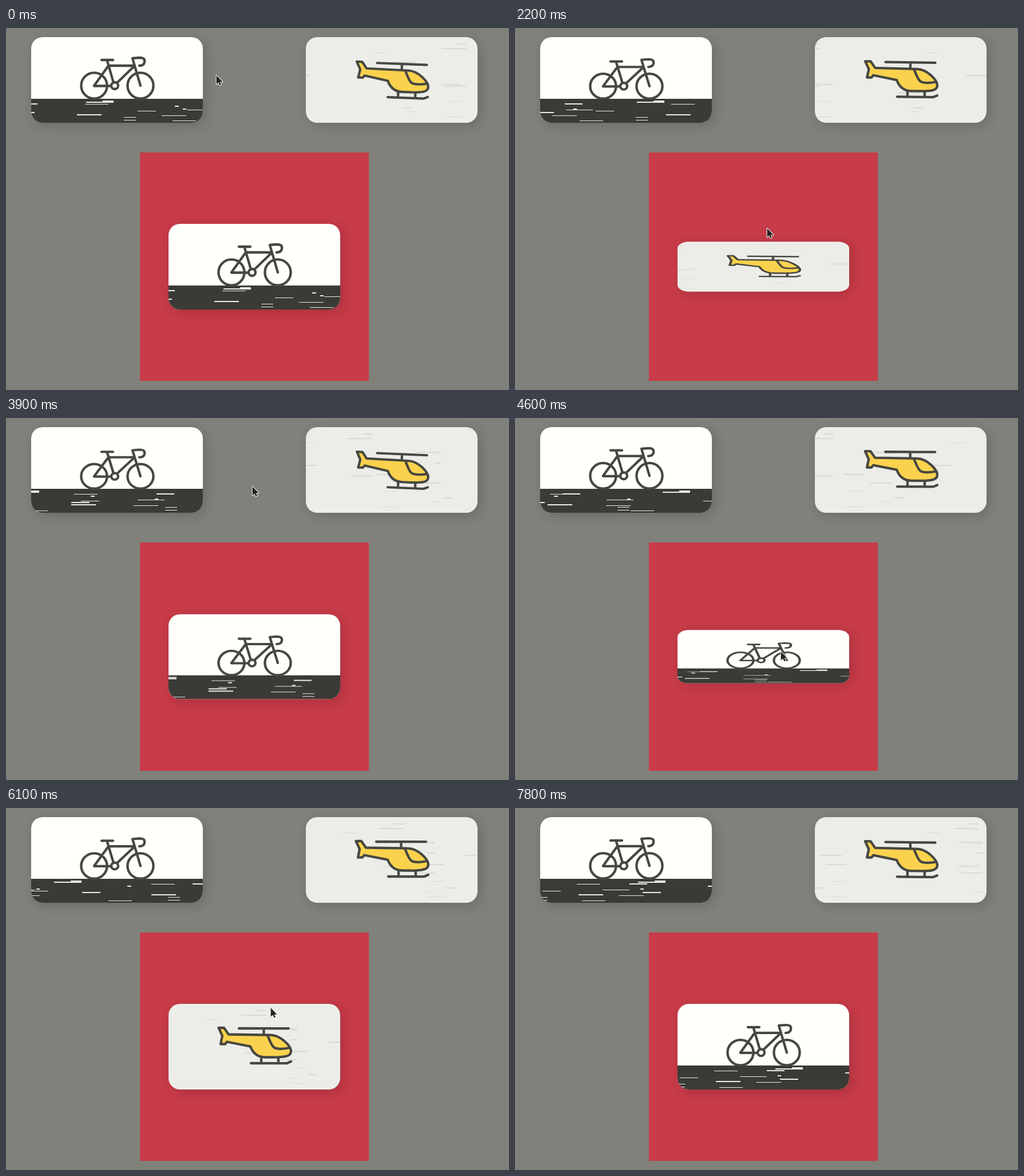
Animation of 879x634 px, one loop 7.9 s. Source, as an HTML page with a canvas:

```html
<!DOCTYPE html>
<html lang="en">
<head>
<meta charset="utf-8">
<title>Flip card</title>
<style>
html, body { margin: 0; width: 100%; height: 100%; overflow: hidden; background: #80817b; }
canvas { display: block; }
</style>
</head>
<body>
<canvas id="stage" width="879" height="634"></canvas>
<script>
const ctx = document.getElementById('stage').getContext('2d');
const LOOP = 7900, FPS = 12, W = 300, H = 150;
const INK = '#474741';
const TRAVEL = 325, AGE = 275.96; // streak path in px, seconds already run

const bike = new Path2D(
  'M123 40H143M133 42L144 80M135 50H180M135 50L110 85M110 85.5H140M150 80L181 50' +
  'M191 85L177 37L189 36C197 36 199 39 198 44C197 49 193 50 189 50');
for (const [x, r] of [[110, 22.6], [191, 22.6], [146, 6]]) {
  bike.moveTo(x + r, 85);
  bike.arc(x, 85, r, 0, Math.PI * 2);
}
const hull = new Path2D(
  'M87.5 42L97 42L105 53.5L178 54.5C196 54.5 214 74 214 83C214 91 206 93 190 93.5' +
  'L169 93.5C154 93.5 147 85 143 74.5L102 66.5L99 70.5L91 70.5L94 56Z');
const gear = new Path2D(
  'M123 43H210M166.5 43V54M173 55C177 65 180 73 184 76C189 80 203 79 211 77' +
  'M162 94V104M192 94V104M144 104H207L214 101');
const arrow = new Path2D('M0 0V15.5L3.5 12.3L5.9 17.3L8.3 16.3L6 11.4H10.8Z');

// Pointer path: seconds, x, y
const trail = [
  [0, 367, 82], [1.45, 425, 165], [1.583, 439, 314], [2.5, 440, 370], [2.917, 422, 177],
  [3.917, 430, 119], [4.583, 464, 408], [6.083, 462, 349], [6.6, 452, 4]
];

const wave = (t, period) => 0.5 - 0.5 * Math.cos(2 * Math.PI * t / period);

// cubic-bezier(.25, .1, .25, 1)
function ease(x) {
  if (x <= 0) return 0;
  if (x >= 1) return 1;
  let lo = 0, hi = 1, p = 0.5;
  for (let i = 0; i < 24; i++) {
    p = (lo + hi) / 2;
    const q = 1 - p;
    if (0.75 * q * q * p + 0.75 * q * p * p + p * p * p < x) lo = p; else hi = p;
  }
  const q = 1 - p;
  return 0.3 * q * q * p + 3 * q * p * p + p * p * p;
}

// The card turns while the pointer is over the red square, and turns back after
function flipAt(t) {
  const run = start => ease((t - start) / 1.5);
  if (t < 2.82) return run(1.55);
  if (t < 4.29) return 1 - run(2.82);
  if (t < 6.2) return run(4.29);
  return 1 - run(6.2);
}

function seeded(seed) {
  return () => (seed = (seed * 16807) % 2147483647) / 2147483647;
}

function makeStreaks(seed, top, bottom, fastest, slowest) {
  const rnd = seeded(seed), count = 14;
  rnd();
  return Array.from({ length: count }, (_, i) => ({
    y: Math.round(top + (bottom - top) * (i + rnd()) / count),
    w: Math.round(3 + 45 * rnd()),
    h: rnd() < 0.5 ? 1 : 2,
    secs: Math.round(10 * (fastest + (slowest - fastest) * rnd())) / 10
  }));
}
const road = makeStreaks(40961, 108, 148, 0.6, 3.9);
const sky = makeStreaks(71993, 3, 145, 2, 3.1);

function drawStreaks(list, t, color) {
  ctx.fillStyle = color;
  for (const { y, w, h, secs } of list) {
    const right = TRAVEL * (1 - (AGE + t) / secs % 1);
    ctx.fillRect(Math.round(right - w), y, w, h);
  }
}

function bikeScene(t) {
  ctx.fillStyle = '#3a3b36';
  ctx.fillRect(0, 108, W, 42);
  ctx.save();
  ctx.translate(0, 109);
  ctx.scale(1, 1 - 0.05 * wave(t - 0.03, 1.6));
  ctx.translate(0, -109);
  ctx.stroke(bike);
  ctx.restore();
  drawStreaks(road, t, '#ecede9');
}

function copterScene(t) {
  drawStreaks(sky, t, '#d9dad6');
  const s = wave(t - 0.52, 1.4);
  ctx.save();
  ctx.translate(0, 106);
  ctx.scale(1, 1 - 0.037 * s);
  ctx.translate(116, -25);
  ctx.rotate(2.7 * s * Math.PI / 180);
  ctx.translate(-116, -81);
  ctx.fillStyle = '#fad24d';
  ctx.fill(hull);
  ctx.stroke(hull);
  ctx.stroke(gear);
  ctx.restore();
}

function card(x, y, t, scene, paper, squash = 1) {
  ctx.save();
  ctx.translate(x, y + H / 2);
  ctx.scale(1, Math.max(squash, 0.001));
  ctx.translate(0, -H / 2);
  ctx.beginPath();
  ctx.roundRect(0, 0, W, H, 20);
  ctx.save();
  ctx.shadowColor = 'rgba(0,0,0,.16)';
  ctx.shadowBlur = 20;
  ctx.shadowOffsetX = 5;
  ctx.shadowOffsetY = 5 * squash;
  ctx.fillStyle = paper;
  ctx.fill();
  ctx.restore();
  ctx.clip();
  ctx.strokeStyle = INK;
  ctx.lineWidth = 4.3;
  ctx.lineCap = ctx.lineJoin = 'round';
  scene(t);
  ctx.restore();
}

const bikeCard = (x, y, t, k) => card(x, y, t, bikeScene, '#fffffb', k);
const copterCard = (x, y, t, k) => card(x, y, t, copterScene, '#ecede9', k);

function pointer(t) {
  const i = trail.findIndex(p => p[0] > t);
  if (i < 1) return;
  const [t0, x0, y0] = trail[i - 1], [t1, x1, y1] = trail[i];
  const k = (t - t0) / (t1 - t0);
  ctx.save();
  ctx.translate(Math.round(x0 + (x1 - x0) * k) + 0.7, Math.round(y0 + (y1 - y0) * k) + 1);
  ctx.lineWidth = 2;
  ctx.lineJoin = 'round';
  ctx.strokeStyle = '#f4f4f0';
  ctx.stroke(arrow);
  ctx.fillStyle = '#22221f';
  ctx.fill(arrow);
  ctx.restore();
}

function draw(ms) {
  // The scene advances at 12 steps a second, shown ten times a second
  const shown = Math.floor(ms / 100) * 100;
  const t = Math.floor(shown * FPS / 1000 + 0.3) / FPS;
  ctx.fillStyle = '#80817b';
  ctx.fillRect(0, 0, 879, 634);
  ctx.fillStyle = '#c83b48';
  ctx.fillRect(234, 218, 400, 400);
  bikeCard(44, 16, t);
  copterCard(524, 16, t);
  const turn = flipAt(t);
  const face = turn < 0.5 ? bikeCard : copterCard;
  face(284, 343, t, Math.abs(Math.cos(Math.PI * turn)));
  pointer(t);
}

const begin = performance.now();
function tick() {
  draw((performance.now() - begin) % LOOP);
  requestAnimationFrame(tick);
}
tick();
</script>
</body>
</html>
```
